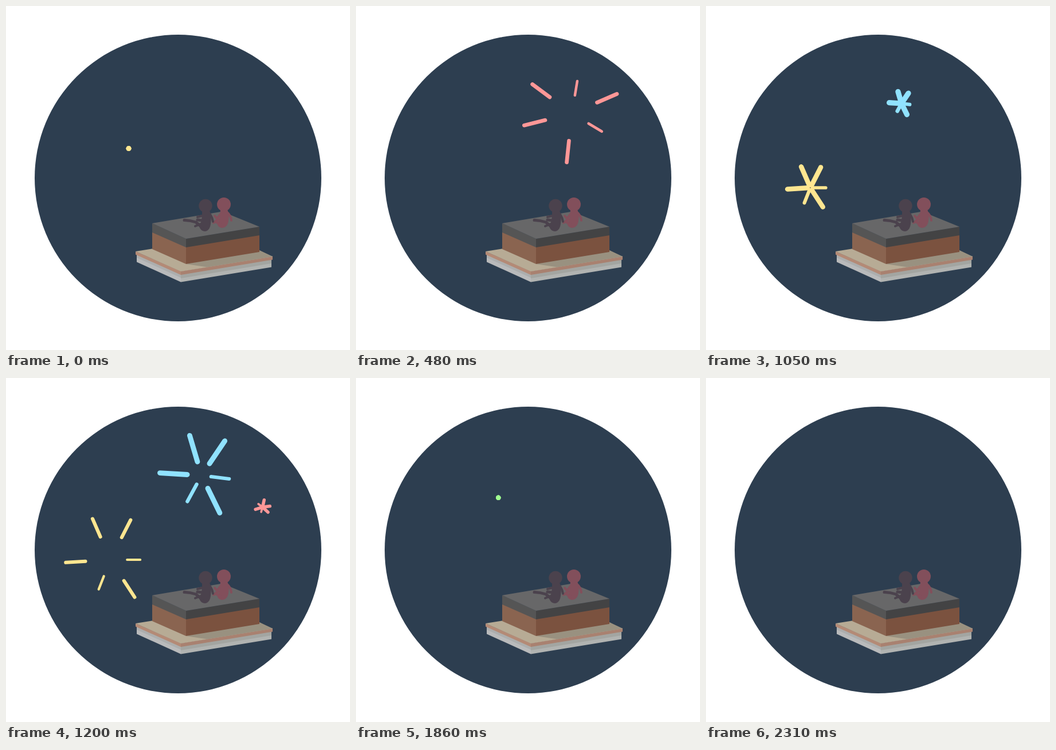
An HTML page with a canvas for the animation above (3.14 s loop, 600 by 600 pixels).

```html
<!DOCTYPE html>
<html>
<head>
<meta charset="utf-8">
<style>
  html, body { margin: 0; width: 100%; height: 100%; overflow: hidden; background: #fff; }
  svg, canvas { position: absolute; left: 0; top: 0; width: 600px; height: 600px; }
</style>
</head>
<body>
<svg viewBox="0 0 600 600">
  <circle cx="300" cy="300" r="250" fill="#2d3e50"/>
  <!-- base -->
  <path fill="#b9babb" d="M228 432 305 468V481.500L228 446.500Z"/>
  <path fill="#acaeae" d="M228 432 305 466V474L228 439Z"/>
  <path fill="#b1b3b1" d="M305 468 463 441V455.500L305 481.500Z"/>
  <path fill="#a3a5a1" d="M305 468 463 441V449L305 475Z"/>
  <path fill="#b48a76" d="M226 428 305 462.500V469L226 433.500Z"/>
  <path fill="#a98170" d="M305 462.500 465 436.500V442.500L305 469Z"/>
  <path fill="#b7ab95" d="M226 428 305 463 465 437 386 402Z"/>
  <path fill="#999180" d="M314 450 351 455.500 465 437 440 425Z"/>
  <!-- house -->
  <path fill="#8a6450" d="M255 394 314 420V450L255 424Z"/>
  <path fill="#7b523f" d="M314 420 442 399V429L314 450Z"/>
  <path fill="#555" d="M255 379 314 406V421L255 395Z"/>
  <path fill="#434344" d="M314 406 442 385V400L314 421Z"/>
  <path fill="#676768" d="M255 379 314 406 442 385 377 358.500Z"/>
  <!-- couple -->
  <g fill="#824f5b" stroke="#824f5b" stroke-linecap="round" stroke-linejoin="round">
    <circle cx="380" cy="346" r="12" stroke="none"/>
    <path stroke="none" d="M374 355H386C389 362 389 368 388 375C387 383 382 387 377 387C372 387 368 383 369 379C374 373 373 364 374 355Z"/>
    <path fill="none" stroke-width="4" d="M387 361Q392 366 393 374M374 363 368 371 364 366M371 372 362 378"/>
    <path fill="none" stroke-width="5" d="M374 381 366 376"/>
  </g>
  <g fill="#4b424d" stroke="#4b424d" stroke-linecap="round" stroke-linejoin="round">
    <circle cx="348" cy="348.500" r="11.700" stroke="none"/>
    <path stroke="none" d="M342 357H355C358 364 358 371 357 380C356 388 352 393 347 393C342 393 338 389 337 384C342 376 342 366 342 357Z"/>
    <path fill="none" stroke-width="4" d="M356 363Q360 369 361 376M342 366 334 368M340 380 330 384"/>
    <path fill="none" stroke-width="5" d="M311 373.500Q322 374 331 377L342 386M342 374 334 373"/>
  </g>
</svg>
<canvas id="sky" width="600" height="600"></canvas>
<script>
const ctx = document.getElementById('sky').getContext('2d');
const LOOP = 3140, STEP = 30, LIFE = 450;

// Each ray: angle in degrees, relative size
const rays = [[0, .67], [57, 1], [111.5, .71], [176.5, 1], [246.5, 1], [297, 1]];

// Distance of the ray ends from the centre, one key every 60 ms
const outer = [0, 19.5, 40, 58.5, 72.5, 82.5, 90.5, 99.5, 105];
const inner = [0, 0, 5, 14, 33, 54.5, 76, 94.5, 108];

const yellow = '#ffe690', pink = '#ff9797', blue = '#90e2ff', green = '#a0ff90';
const bursts = [
  { start: 0, x: 214, y: 248.5, size: 1.05, turn: 138, color: yellow },
  { start: 210, x: 376.5, y: 187.5, size: 1.1, turn: 279.5, color: pink },
  { start: 930, x: 182, y: 317, size: 1, turn: 0, color: yellow },
  { start: 990, x: 341, y: 170, size: 1.1, turn: 7, color: blue },
  { start: 1140, x: 447.5, y: 225.3, size: .66, turn: 106, color: pink },
  { start: 1860, x: 248.3, y: 208.8, size: 1, turn: -27, color: green }
];

// Catmull-Rom through evenly spaced keys
function curve(keys, t) {
  const i = Math.floor(t / 60), u = t / 60 - i;
  const b = keys[i], c = keys[i + 1];
  const a = i ? keys[i - 1] : b, d = keys[i + 2] ?? c;
  return b + u / 2 * (c - a + u * (2 * a - 5 * b + 4 * c - d + u * (3 * (b - c) + d - a)));
}

function drawBurst({ start, x, y, size, turn, color }, now) {
  const t = now - start;
  if (t < 0 || t >= LIFE) return;
  const near = Math.max(0, curve(inner, t)), far = curve(outer, t) + .02;
  const width = 8.4 * Math.min(1, (LIFE - t) / 250);
  ctx.strokeStyle = color;
  for (const [angle, scale] of rays) {
    const a = (angle + turn) * Math.PI / 180, k = size * scale;
    const dx = Math.cos(a) * k, dy = Math.sin(a) * k;
    ctx.lineWidth = width * k;
    ctx.beginPath();
    ctx.moveTo(x + dx * near, y + dy * near);
    ctx.lineTo(x + dx * far, y + dy * far);
    ctx.stroke();
  }
}

function frame() {
  const now = Math.floor(performance.now() % LOOP / STEP) * STEP;
  ctx.clearRect(0, 0, 600, 600);
  ctx.lineCap = 'round';
  for (const burst of bursts) drawBurst(burst, now);
  requestAnimationFrame(frame);
}
frame();
</script>
</body>
</html>
```
